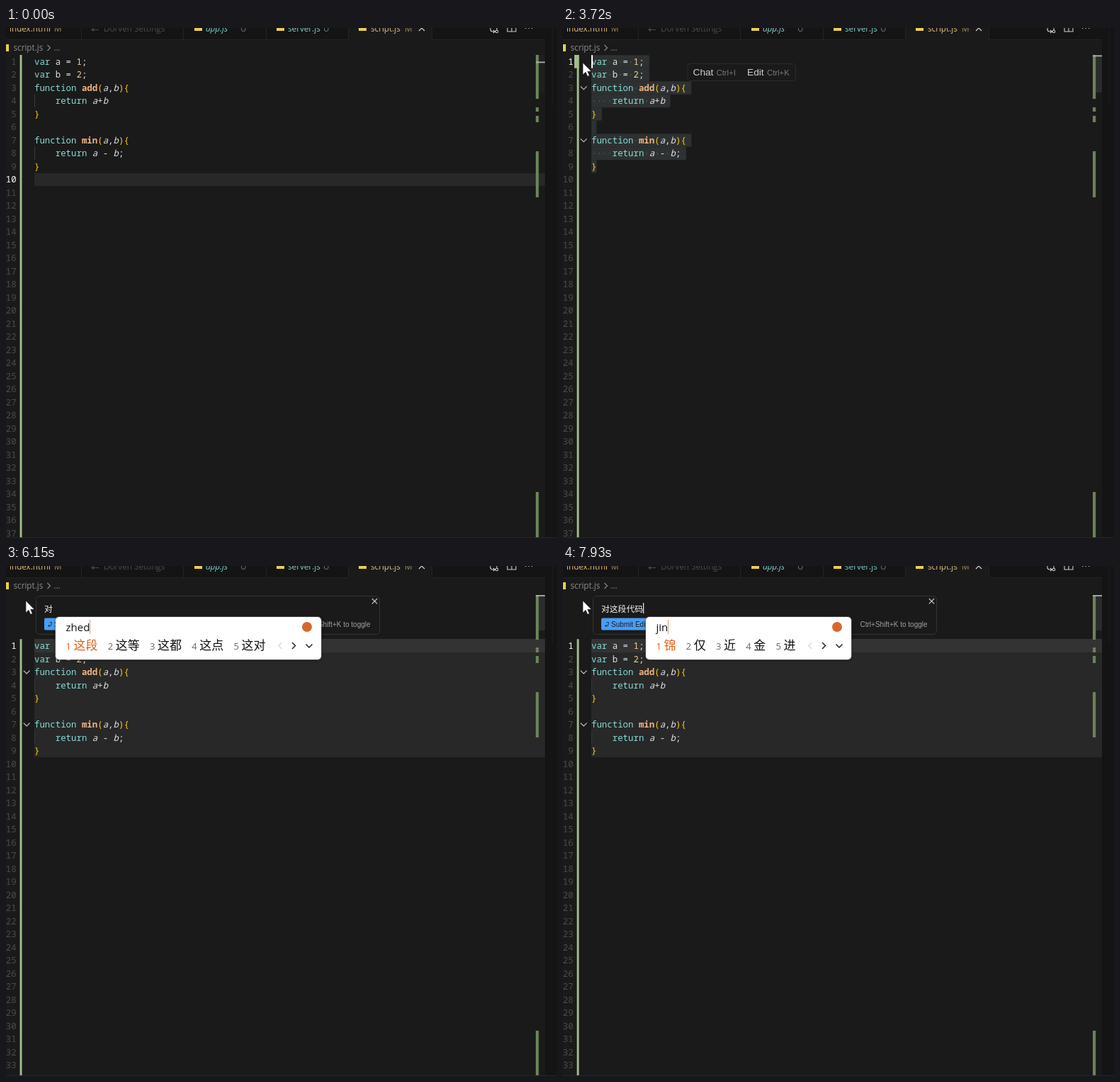
An HTML page that plays this animation: 778x720 px, repeating every 8 s.

```html
<!DOCTYPE html>
<html lang="en">
<head>
<meta charset="utf-8">
<title>Editor prompt</title>
<style>
html, body { margin: 0; width: 100%; height: 100%; overflow: hidden; background: #1a1a1a; }
#stage { position: relative; width: 778px; height: 720px; overflow: hidden; }
svg { display: block; }
text { white-space: pre; }
.ui { font-family: "Open Sans", "Noto Sans", sans-serif; font-size: 11.7px; }
.sans { font-family: "Liberation Sans", Arial, sans-serif; font-size: 10px; }
.mono { font-family: "Noto Sans Mono", monospace; font-size: 12.4px; fill: #e2e2e8; }
.kw { fill: #86dbd7; }
.fn { fill: #f2b484; font-weight: 700; }
.num { fill: #f0cd92; }
.br { fill: #fccb1a; }
.it { font-style: italic; }
.no { fill: #4b4b4b; text-anchor: end; }
.no.on { fill: #fff; font-weight: 500; }
.dots { fill: #595b5b; }
.line { fill: none; stroke: #ccc; stroke-width: 1.1; }
.crisp { shape-rendering: crispEdges; }
.cjk { font-family: "Noto Sans CJK SC", "Noto Sans CJK", sans-serif; font-size: 11.8px; fill: #f4f4f4; }
#ime {
  position: absolute; top: 72px; height: 60px; border-radius: 5px; background: #fff; color: #111;
  box-shadow: 0 0 0 1px #8886, 0 1px 4px #0006;
  font-family: "Open Sans", "DejaVu Sans", "Noto Sans CJK SC", "Noto Sans CJK", sans-serif;
}
#typed { position: absolute; left: 14.5px; top: 4px; font-size: 15px; line-height: 20px; border-right: 1px solid #e09a70; }
#row { display: flex; padding: 29px 0 0 14.5px; line-height: 22px; white-space: pre; }
#row span { font-size: 17px; margin-right: 14.2px; }
#row i { font: 13px "Open Sans", sans-serif; color: #666; margin-right: 3.6px; }
#row span:first-child, #row span:first-child i { color: #e2601c; }
#row svg { margin-left: -14.2px; }
#badge { position: absolute; right: 13px; top: 7px; width: 14px; height: 14px; border-radius: 50%; background: #d8662c; }
</style>
</head>
<body>
<div id="stage">
<svg width="778" height="720" viewBox="0 0 778 720">
  <rect width="778" height="720" fill="#1a1a1a"/>

  <g id="editor">
    <rect id="block" class="crisp" x="40" y="38.2" width="721" height="166.500" fill="#282828"/>
    <rect id="current" class="crisp" x="40" width="721" height="18.500"/>
    <g id="sel" fill="#2e3131"></g>
    <path id="guides" d="M40.500 93.700v18.500M40.500 167.700v18.500" stroke="#383838"/>
    <rect x="19.600" y="38" width="2.900" height="690" fill="#a3be8c"/>
    <rect id="wide" x="16" y="38" width="6.500" height="18.700" fill="#a3be8c"/>
    <path id="folds" class="line" d="M24.800 82.400l4.400 4.400 4.400-4.400M24.800 156.400l4.400 4.400 4.400-4.400"/>
    <g id="code"></g>
    <text id="hint" class="ui" x="53" y="219.700" style="font-size:13.300px" fill="#777">Ctrl+I to chat, Ctrl+K to generate</text>
    <rect id="caret" width="2" height="18.500" fill="#fff"/>
  </g>

  <rect id="slider" x="748" y="38" width="13" height="53" fill="#fff"/>
  <g id="ruler" fill="#6b8259"></g>
  <rect id="mark" x="748" width="13" height="1.800" fill="#b0b0b0"/>

  <rect x="761" width="17" height="720" fill="#141414"/>
  <rect x="771" width="1" height="110" fill="#1c1c1c"/>
  <rect y="719" width="778" height="1" fill="#262626"/>

  <g class="ui">
    <rect width="761" height="16" fill="#141414"/>
    <rect x="484" width="117" height="17" fill="#1a1a1a"/>
    <path d="M0 16.500H484M601 16.500H761M106.500 0v16M250.500 0v16M367.500 0v16M483.500 0v16M601.500 0v16" stroke="#232323"/>
    <g fill="#e8cf4f">
      <rect x="266" y="-7" width="11" height="11"/>
      <rect x="382" y="-7" width="11" height="11"/>
      <rect x="498" y="-7" width="11" height="11"/>
      <rect x="-6" y="23" width="10" height="10"/>
    </g>
    <g fill="#e2bd80"><text x="5" y="4.500">index.html</text><text x="515" y="4.500">script.js</text></g>
    <g fill="#a58c60"><text x="68" y="4.500">M</text><text x="563" y="4.500">M</text></g>
    <text x="138" y="4.500" fill="#4c4c4c">Dorven Settings</text>
    <path class="line" style="stroke:#4c4c4c" d="M121 2.500h10M124 .5l-3 2 3 2"/>
    <g fill="#82d2ce"><text x="282" y="4.500" class="it">app.js</text><text x="398" y="4.500">server.js</text></g>
    <g fill="#5d7f7d"><text x="331" y="4.500">U</text><text x="448" y="4.500">U</text></g>
    <path class="line" style="stroke:#ddd" d="M583-4l8 8M591-4l-8 8"/>
    <path class="line" d="M684-3v5q0 3 3 3h3M688 3l2.500 2-2.500 2M693-2v5M708-4v9h12v-9M714-4v9"/>
    <circle cx="693" cy="5" r="1.800" class="line"/>
    <path d="M733 .5h1.500M737.500 .5h1.500M742 .5h1.500" stroke="#aaa"/>
    <text x="10.500" y="32" fill="#8c8c8c">script.js</text>
    <path class="line" style="stroke:#8c8c8c" d="M58.500 24l4 4-4 4"/>
    <text x="67.500" y="32" fill="#8c8c8c">…</text>
  </g>

  <g id="tip" class="sans">
    <rect x="176" y="50.500" width="152.500" height="24" rx="4" fill="#1a1a1a" stroke="#2b2b2b"/>
    <g fill="#d0d0d0" style="font-size:13.700px"><text x="183.500" y="67">Chat</text><text x="260" y="67">Edit</text></g>
    <g fill="#7a7a7a" style="font-size:11.300px"><text x="216.500" y="66.500">Ctrl+I</text><text x="288" y="66.500">Ctrl+K</text></g>
  </g>

  <g id="prompt" class="sans">
    <rect x="42.500" y="42.500" width="485" height="54" rx="5" fill="#1a1a1a" stroke="#343434"/>
    <g id="empty" fill="#6a6a6a">
      <text x="57" y="63.500" style="font-size:11.500px">Editing instructions...</text>
      <text x="54.500" y="86">Esc to close</text>
    </g>
    <g id="filled">
      <path class="line" d="M516.800 46l7.400 7.400M524.200 46l-7.400 7.400"/>
      <rect x="54" y="73.500" width="68" height="17" rx="2" fill="#4c9df3"/>
      <path class="line" style="stroke:#1b2a3c;stroke-width:.9" d="M61.500 79.500h3l-1 5h-4M61.500 82.500l-2 2 2 1.500"/>
      <text x="68" y="86" fill="#16202c">Submit Edit</text>
      <path class="line" style="stroke:#9a9a9a;stroke-width:.9" d="M134 80.500h2.500l2.500 4h2.500M138.500 80.500h3M146 79.500h3l-1 5h-4M146 82.500l-2 2 2 1.500"/>
      <text x="152" y="86" fill="#a6a6a6">quick question</text>
    </g>
    <path class="line" style="stroke:#999" d="M318 80.500l2.700 2.700 2.700-2.700"/>
    <text x="327" y="85.500" fill="#b4b4b4">velune-5.1-stanza</text>
    <text x="419.500" y="86" fill="#a0a0a0">Ctrl+Shift+K to toggle</text>
    <text id="input" class="cjk" x="54" y="64.500"></text>
    <rect id="bar" y="52" width="1.200" height="15" fill="#eee"/>
  </g>

  <g id="mouse">
    <circle id="press" r="11.500" fill="#fff000"/>
    <path id="beam" d="M-2.500-7.500q3 0 3.500 1.500.5-1.500 3.500-1.500M1-6V6M-2.500 7.500q3 0 3.500-1.500.5 1.500 3.500 1.500" fill="none" stroke="#f0efcf" stroke-width="1.500"/>
    <path id="arrow" d="M0-1V16L4 12.300 6.700 18.300 9.300 17.200 6.700 11.300H12Z" fill="#fff" stroke="#111" stroke-width=".6"/>
  </g>
</svg>
<div id="ime">
  <div id="typed"></div>
  <div id="badge"></div>
  <div id="row"></div>
</div>
</div>
<script>
const LOOP = 8000, TOP = 38.2, LH = 18.5, CW = 7.44, LEFT = 40, SHIFT = 65.2;
const OPEN = 3820, FOCUS = 910, DRAG = 1000, DROP = 1700;
const $ = id => document.getElementById(id);
const show = (id, on) => { $(id).style.display = on ? '' : 'none'; };
const set = (el, attrs) => { for (const k in attrs) el.setAttribute(k, attrs[k]); };
const within = (t, spans) => spans.some(([a, b]) => t >= a && t < b);
const clamp = (v, lo = 0, hi = 1) => Math.min(hi, Math.max(lo, v));
const at = (list, t) => list.filter(e => e[0] <= t).pop();

const lines = ['var a = 1;', 'var b = 2;', 'function add(a,b){', '    return a+b', '}', '',
  'function min(a,b){', '    return a - b;', '}'];
const END = [8, 1];

// [time, committed text]
const texts = [[0, ''], [5370, '对'], [6520, '对这段'], [7650, '对这段代码']];

// [time, typed letters, candidates]
const typing = [[0, ''],
  [5070, 'd', '的 大 对 d 都'], [5220, 'dui', '对 队 堆 兑 怼'], [5370, ''],
  [5660, 'z', '在 中 这 再 做'], [5790, 'zh', '这 中 真 只 找'], [5940, 'zhe', '这 着 者 折 哲'],
  [6150, 'zhed', '这段 这等 这都 这点 这对'], [6520, ''],
  [7010, 'd', '的 大 对 _(:з」∠)_ の'], [7180, 'da', '大 打 达 搭 答'], [7270, 'dai', '带 代 戴 待 袋'],
  [7350, 'daim', '代码 带忙 待命 戴帽 带们'], [7440, 'daima', '代码 大妈 带马 代 带'], [7650, ''],
  [7790, 'j', '就 及 级 家 加'], [7860, 'ji', '及 级 几 机 记'], [7930, 'jin', '锦 仅 近 金 进']];

const rulers = [[[38, 100], [112, 118], [124, 133], [174, 239], [655, 719]],
  [[41, 104], [115, 122], [127, 137], [178, 242], [656, 719]]];
const nav = '<svg width="79" height="22"><g class="line" style="stroke:#222;stroke-width:1.5">' +
  '<path style="stroke:#ddd" d="M23 7l-4 4.500 4 4.500"/><path d="M38 7l4.500 4.500-4.500 4.500M57.500 9.500l4.500 4.500 4.500-4.500"/></g></svg>';

function highlight(s) {
  const plain = s.startsWith('var');
  return s.replace(/\b(var|function|return)\b|(\w+)(?=\()|(\d)|([(){}])|\b([ab])\b/g, (m, kw, fn, num, br) => {
    const c = kw ? 'kw' : fn ? 'fn' : num ? 'num' : br ? 'br' : plain ? '' : 'it';
    return `<tspan class="${c}">${m}</tspan>`;
  });
}

const baseline = i => TOP + i * LH + 13.7;
$('code').innerHTML =
  Array.from({ length: 38 }, (_, i) => `<text class="mono no" x="14.700" y="${baseline(i)}">${i + 1}</text>`).join('') +
  lines.map((s, i) => `<text class="mono" x="${LEFT}" y="${baseline(i)}">${highlight(s)}</text>`).join('');
$('sel').innerHTML = lines.map((_, i) =>
  `<rect y="${TOP + i * LH}" height="${LH + .1}" rx="1.5"/><text class="mono dots" y="${baseline(i)}"></text>`).join('');
const numbers = document.querySelectorAll('.no');
const selRects = $('sel').querySelectorAll('rect'), selDots = $('sel').querySelectorAll('text');

function pointer(t) {
  const k = 1 - (1 - clamp((t - 70) / 750)) ** 2.5;
  const d = clamp((t - DRAG) / (DROP - DRAG)), e = d * d * (3 - 2 * d);
  return [330 - 247 * k - 55 * e, 687 - 486 * k - 151 * e];
}

function caretPos(t, x, y) {
  if (t < DRAG) return [9, 0];
  const row = clamp(Math.floor((y - TOP) / LH), 0, 8);
  return [row, clamp(Math.round((x - LEFT) / CW), 0, lines[row].length)];
}

function drawSelection(row, col, on) {
  lines.forEach((s, i) => {
    const from = i === row ? col : 0, to = i === END[0] ? END[1] : s.length + 1;
    const x = LEFT + from * CW;
    set(selRects[i], { x, width: on && i >= row ? (to - from) * CW : 0 });
    set(selDots[i], { x });
    selDots[i].textContent = on && i >= row ? s.slice(from).replace(/./g, c => c === ' ' ? '·' : ' ') : '';
  });
}

function drawEditor(t, x, y) {
  const open = t >= OPEN;
  const [row, col] = open ? [0, 0] : caretPos(t, x, y);
  const selecting = !open && t >= DRAG && (row !== END[0] || col !== END[1]);
  set($('editor'), { transform: `translate(0 ${open ? SHIFT : 0})` });
  show('block', open);
  show('current', !selecting);
  set($('current'), { y: TOP + row * LH, fill: open ? '#333' : '#282828' });
  drawSelection(row, col, selecting);
  show('guides', !selecting);
  numbers.forEach((n, i) => n.classList.toggle('on', i === row));
  show('hint', t >= FOCUS && t < DRAG);
  show('caret', t >= FOCUS && !open && !within(t, [[2110, 2640], [3160, 3640]]));
  set($('caret'), { x: LEFT + col * CW, y: TOP + row * LH });
  show('wide', t >= 2350 && !open);
  set($('folds'), { opacity: clamp((t - 2350) / 250) });

  set($('slider'), { y: open ? 41 : 38, height: open ? 50 : 53, opacity: .025 + .055 * clamp((t - 70) / 150) });
  $('ruler').innerHTML = rulers[+open].map(([a, b]) => `<rect x="748" y="${a}" width="4.200" height="${b - a}"/>`).join('');
  set($('mark'), { y: open ? 41 : 38.5 + row });
  set($('tip'), { opacity: open ? 0 : clamp((t - 2050) / 120) });
}

function drawMouse(t, x, y) {
  const arrow = t >= 2350;
  show('mouse', t >= 70);
  set($('mouse'), { transform: `translate(${x} ${y})` });
  show('beam', !arrow);
  show('arrow', arrow);
  set($('press'), { opacity: t < FOCUS ? 0 : .58 * clamp((2180 - t) / 200) });
}

let shown = null;
function drawPrompt(t) {
  const text = at(texts, t)[1], entry = at(typing, t);
  const x = 54 + text.length * 11.8;
  show('prompt', t >= OPEN);
  show('empty', !text);
  show('filled', text);
  $('input').textContent = text;
  set($('bar'), { x });
  show('bar', !within(t, [[4370, 4860], [5940, 6520], [7096, 7440]]));

  if (entry === shown) return;
  shown = entry;
  show('ime', entry[1]);
  if (!entry[1]) return;
  $('ime').style.left = Math.round(x + 4.3) + 'px';
  $('typed').textContent = entry[1];
  $('row').innerHTML = entry[2].split(' ').map((c, i) => `<span><i>${i + 1}</i>${c}</span>`).join('') + nav;
}

function frame() {
  const t = performance.now() % LOOP;
  const [x, y] = pointer(t);
  drawEditor(t, x, y);
  drawPrompt(t);
  drawMouse(t, x, y);
  requestAnimationFrame(frame);
}
frame();
</script>
</body>
</html>
```
